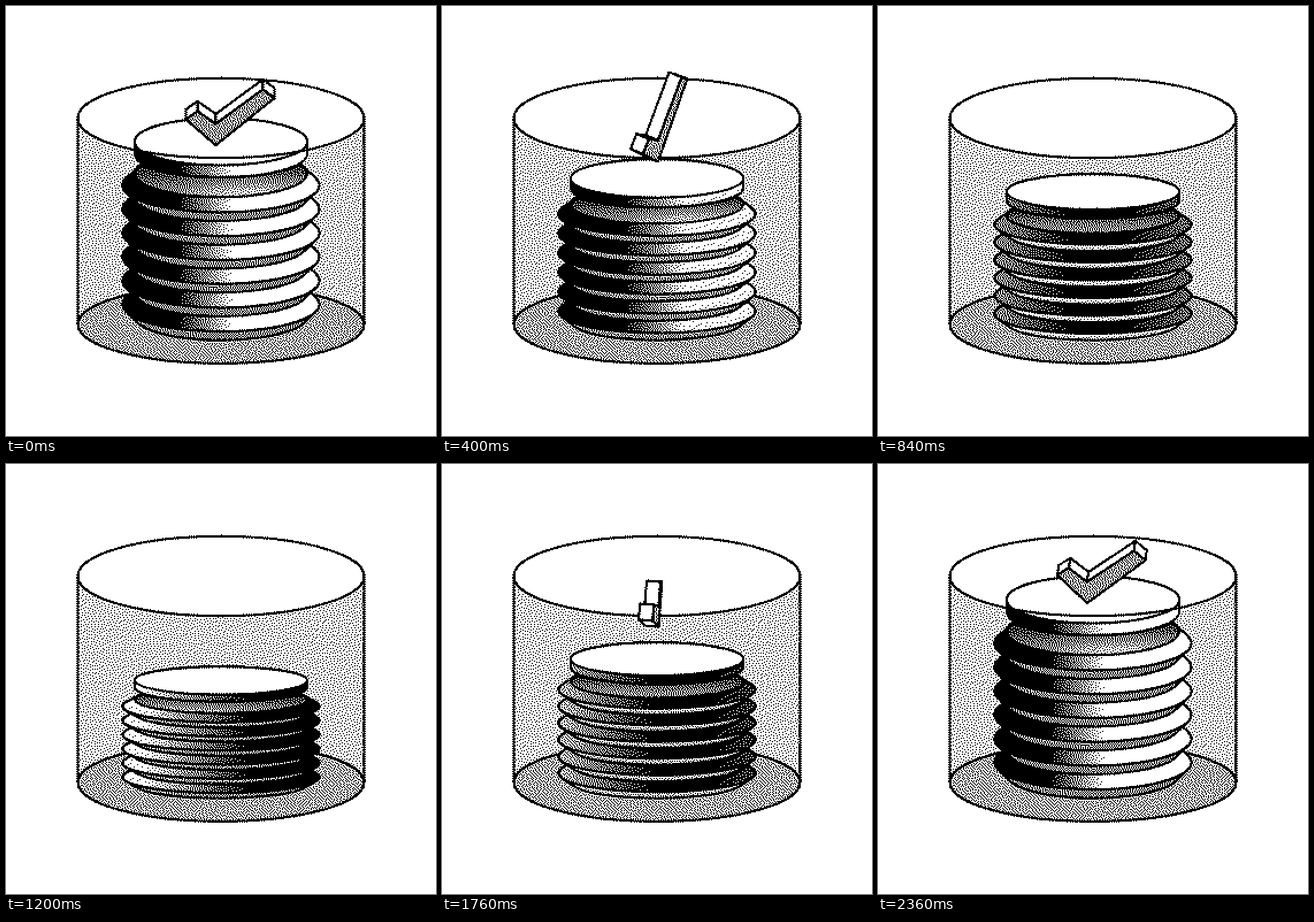
Recreate the animation shown at these times as an HTML page with a canvas. Size 748 by 748 pixels, loop 2.4 s.

```html
<!DOCTYPE html>
<html lang="en">
<head>
<meta charset="utf-8">
<style>
html, body { margin: 0; width: 100%; height: 100%; overflow: hidden; background: #fff; }
canvas { display: block; width: 100vw; height: 100vh; image-rendering: pixelated; }
</style>
</head>
<body>
<canvas id="stage" width="374" height="374"></canvas>
<script>
const STAGE = 748, N = 374, LOOP = 2400, STEP = 40;
const ctx = document.getElementById('stage').getContext('2d', { willReadFrequently: true });
const clamp = v => Math.min(1, Math.max(0, v));
const gray = v => `rgb(${Array(3).fill(Math.round(clamp(v) * 255))})`;

// Smooth 0 to 1 between two times.
function ramp(t, from, to) {
  const p = clamp((t - from) / (to - from));
  return p * p * (3 - 2 * p);
}

// Two presses down, one release.
const squash = t => 1 - (ramp(t, 0, 600) + ramp(t, 800, 1480)) / 4 + ramp(t, 1500, 2100) / 2;
const swing = t => 2 * (ramp(t, 200, 1400) - ramp(t, 1480, 2240)) - 1;
const size = t => 1 - ramp(t, 520, 740) + ramp(t, 1480, 1800);

function paint(fill, stroke = true) {
  if (fill) { ctx.fillStyle = fill; ctx.fill(); }
  if (stroke) ctx.stroke();
}

function ellipse(y, rx, ry, fill, stroke) {
  ctx.beginPath();
  ctx.ellipse(374, y, rx, ry, 0, 0, 2 * Math.PI);
  paint(fill, stroke);
}

function container() {
  ctx.beginPath();
  ctx.ellipse(374, 195, 249, 69.5, 0, Math.PI, 0, true);
  ctx.ellipse(374, 554, 249, 68, 0, 0, Math.PI);
  ctx.closePath();
  paint(gray(.83), false);
  ellipse(554, 249, 68, gray(.67));
}

function rim() {
  ellipse(195, 249, 69.5);
  ctx.beginPath();
  for (const x of [125, 623]) { ctx.moveTo(x, 195); ctx.lineTo(x, 554); }
  ctx.stroke();
}

// Horizontal shading: a dark band that swings from side to side.
function shading(k) {
  const g = ctx.createLinearGradient(0, 0, STAGE, 0), mid = 370 + 118 * k, fall = 145 + 45 * k;
  const stop = (x, v) => g.addColorStop(x / STAGE, gray(v));
  stop(mid - 45 - fall, .55 + .45 * k);
  stop(mid - 45, 0);
  stop(mid + 45, 0);
  stop(mid + 45 + fall, .55 - .45 * k);
  return g;
}

function bellows(t) {
  const s = squash(t), flat = .273 * s, Y = y => 581 - (581 - y) * s;
  const k = swing(t), main = shading(k), under = gray(.86 - .36 * Math.abs(k));

  // Convex hull of an upper and a lower ring.
  function frustum(ya, ra, yb, rb, fill) {
    const a = Math.asin((rb - ra) * .273 / (yb - ya));
    ctx.beginPath();
    ctx.ellipse(374, Y(yb), rb, rb * flat, 0, -a, Math.PI + a);
    ctx.ellipse(374, Y(ya), ra, ra * flat, 0, Math.PI + a, 2 * Math.PI - a);
    ctx.closePath();
    paint(fill);
  }
  const disc = (y, fill, stroke) => ellipse(Y(y), 150, 150 * flat, fill, stroke);

  for (let i = 5; i >= 0; i--) {
    const y = 312 + 41.5 * i;
    frustum(y, 171, y + 21, 150, under);
    frustum(y - 20.5, 150, y, 171, main);
  }
  const neck = 291.5, depth = ctx.createLinearGradient(0, Y(284), 0, Y(neck + 41));
  depth.addColorStop(0, 'rgba(0,0,0,.8)');
  depth.addColorStop(1, 'rgba(0,0,0,0)');
  disc(neck, gray(.9), false);
  ctx.globalAlpha = .3;
  disc(neck, main, false);
  ctx.globalAlpha = 1;
  disc(neck, depth);
  frustum(236, 150, 257, 150, main);
  disc(236, '#fff');
}

const tick = [[0, 0], [102, 82], [82, 97], [0, 37], [-32, 59], [-52, 45]];

function check(t) {
  const q = size(t), a = t / LOOP * 2 * Math.PI, c = Math.cos(a), s = Math.sin(a);
  if (q < .01) return;
  const half = 12.5, tilt = .7, base = 233.5 + 127 * (1 - squash(t)) ** .8;
  const ring = w => tick.map(([u, v]) => {
    const z = w * c - u * s;
    return { x: 365 + (u * c + w * s) * Math.sqrt(q), y: base + (z * tilt - v) * q, near: z + tilt * v };
  });
  const front = ring(half), back = ring(-half);
  const area = f => f.reduce((sum, p, i) => {
    const n = f[(i + 1) % f.length];
    return sum + p.x * n.y - n.x * p.y;
  }, 0);
  const mean = f => f.reduce((sum, p) => sum + p.near, 0) / f.length;
  const draw = (f, fill) => {
    ctx.beginPath();
    f.forEach(p => ctx.lineTo(p.x, p.y));
    ctx.closePath();
    paint(fill);
  };
  tick.map((_, i) => {
    const j = (i + 1) % tick.length;
    return [front[i], back[i], back[j], front[j]];
  }).filter(f => area(f) < 0).sort((f, g) => mean(f) - mean(g)).forEach(f => draw(f, '#fff'));
  draw(c > 0 ? front : back, gray(.6));
}

// One-bit look: error diffusion with a little seeded jitter.
function stipple() {
  const img = ctx.getImageData(0, 0, N, N), px = img.data;
  const g = Float32Array.from({ length: N * N }, (_, i) => px[i * 4]);
  let seed = 7;
  for (let i = 0; i < N * N; i++) {
    seed = (seed * 16807) % 2147483647;
    const raw = px[i * 4], solid = raw > 250 || raw < 5;
    const limit = 128 + (seed / 2147483647 - .5) * 50;
    const out = (solid ? raw : g[i]) < limit ? 0 : 255;
    if (!solid) {
      const e = (g[i] - out) / 16;
      g[i + 1] += e * 7;
      g[i + N - 1] += e * 3;
      g[i + N] += e * 5;
      g[i + N + 1] += e;
    }
    px[i * 4] = px[i * 4 + 1] = px[i * 4 + 2] = out;
  }
  ctx.putImageData(img, 0, 0);
}

function render(t) {
  ctx.setTransform(N / STAGE, 0, 0, N / STAGE, 0, 0);
  ctx.fillStyle = '#fff';
  ctx.fillRect(0, 0, STAGE, STAGE);
  ctx.strokeStyle = '#000';
  ctx.lineWidth = 4;
  ctx.lineJoin = 'round';
  container();
  bellows(t);
  rim();
  check(t);
  stipple();
}

const start = performance.now();
let last = -1;
function loop() {
  const t = Math.floor((performance.now() - start) % LOOP / STEP) * STEP;
  if (t !== last) render(last = t);
  requestAnimationFrame(loop);
}
loop();
</script>
</body>
</html>
```
